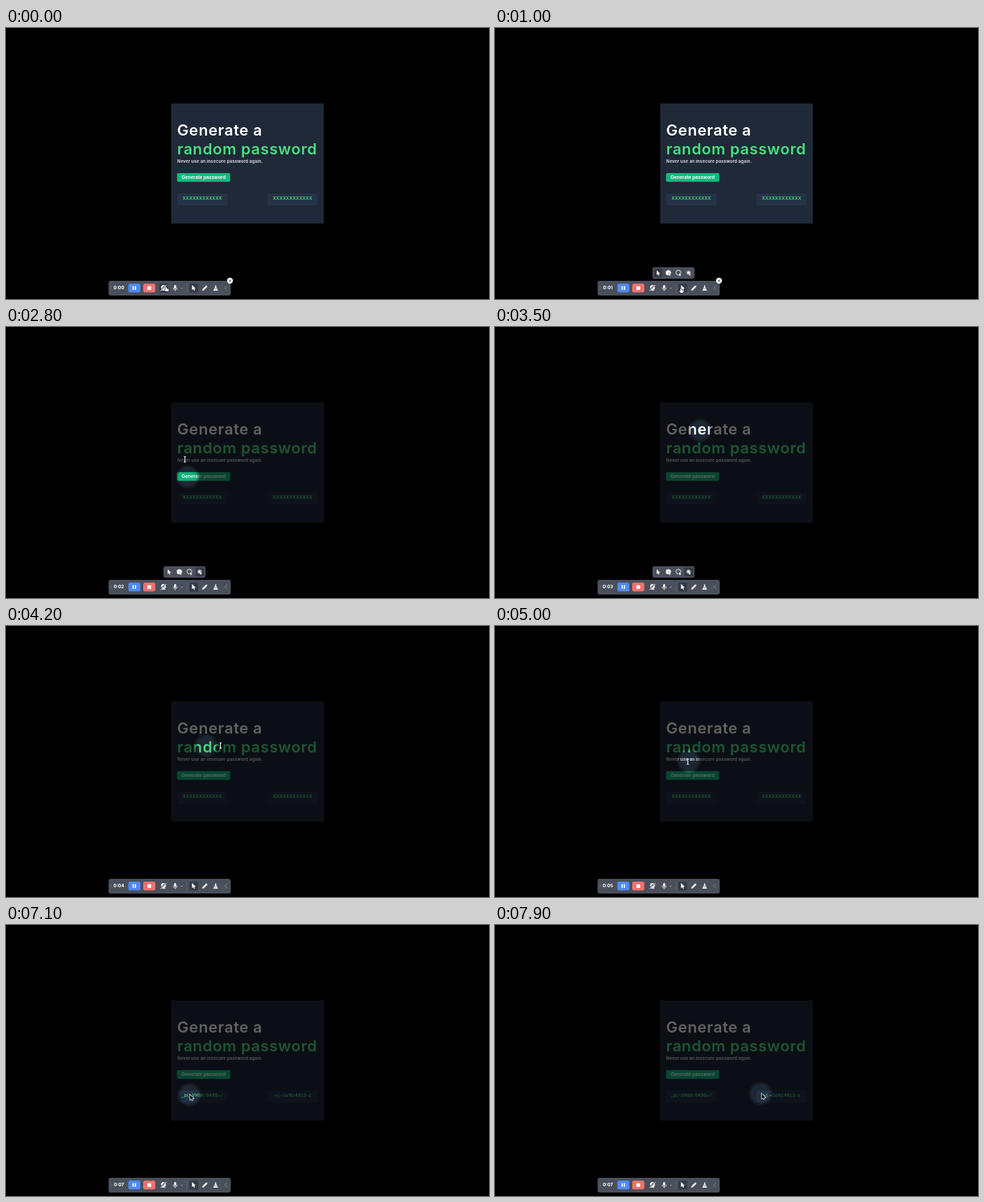
Animation of 690 by 388 pixels, one loop 8 s. Source, as an HTML page with a canvas:

```html
<!DOCTYPE html>
<html lang="en">
<head>
<meta charset="utf-8">
<title>Password generator with spotlight</title>
<style>
  html, body { margin: 0; width: 100%; height: 100%; overflow: hidden; background: #000; }
  canvas { display: block; }
</style>
</head>
<body>
<canvas id="stage" width="690" height="388"></canvas>
<script>
const LOOP = 8000, SPOT_R = 18, SPOT_LAG = 60;
const ctx = document.getElementById('stage').getContext('2d');
const shade = new OffscreenCanvas(218, 172);
const shadeCtx = shade.getContext('2d');
const CARD = { x: 236, y: 108, w: 218, h: 172 };
const SANS = 'Inter, "Open Sans", sans-serif';

// Pointer stops: time, x, y
const PATH = [
  [0, 229, 372], [300, 229, 372], [700, 266, 374], [1100, 266, 374],
  [1700, 278.5, 350], [2350, 278.5, 350], [2980, 250, 150], [3400, 293, 148],
  [3520, 293, 148], [3650, 345, 148], [4000, 262, 171], [4600, 432, 171],
  [4930, 277, 193], [5000, 275.5, 194], [5300, 268, 190], [5700, 268, 190],
  [6050, 290, 214], [6300, 304, 211], [6500, 298, 234], [6850, 262, 243],
  [7060, 262, 243], [7900, 381, 241.5]
];

const ARROW = new Path2D('M0 0V8.2L2 6.4L3.3 9.2L4.6 8.6L3.4 5.9H6Z');
const HAND = new Path2D('M-.9 .2Q0 -.9 .9 .2V2.6L4 3.3Q5 3.6 4.7 5L4 7.6H-.6L-3 4.6Q-2.6 3.5 -.9 4.5Z');
const PENCIL = new Path2D('M-3.8 3.8L-3.2 1.4L1.6 -3.4Q2.4 -4 3.2 -3.2Q4 -2.4 3.4 -1.6L-1.4 3.2Z');
const BROOM = new Path2D('M-.8 -4H.8V-.4H2.4V1H-2.4V-.4H-.8ZM-2.6 1.6H2.6L3.6 3.8H-3.6Z');

const within = (t, a, b) => t >= a && t < b;

function pointerAt(t) {
  let i = 1;
  while (i < PATH.length - 1 && PATH[i][0] < t) i++;
  const [t0, x0, y0] = PATH[i - 1], [t1, x1, y1] = PATH[i];
  const u = Math.min(1, Math.max(0, (t - t0) / (t1 - t0)));
  const e = u * u * (3 - 2 * u);
  return { x: x0 + (x1 - x0) * e, y: y0 + (y1 - y0) * e };
}

function box(x, y, w, h, r, fill) {
  ctx.fillStyle = fill;
  ctx.beginPath();
  ctx.roundRect(x, y, w, h, r);
  ctx.fill();
}

function disc(x, y, r, fill) {
  ctx.fillStyle = fill;
  ctx.beginPath();
  ctx.arc(x, y, r, 0, 7);
  ctx.fill();
}

function ring(x, y, r, color, width) {
  ctx.strokeStyle = color;
  ctx.lineWidth = width;
  ctx.beginPath();
  ctx.arc(x, y, r, 0, 7);
  ctx.stroke();
}

function line(color, width, ...pts) {
  ctx.strokeStyle = color;
  ctx.lineWidth = width;
  ctx.beginPath();
  for (let i = 0; i < pts.length; i += 2) ctx.lineTo(pts[i], pts[i + 1]);
  ctx.stroke();
}

function text(str, x, y, font, fill, align = 'left', spacing = 0) {
  ctx.font = font;
  ctx.letterSpacing = spacing + 'px';
  ctx.fillStyle = fill;
  ctx.textAlign = align;
  ctx.fillText(str, x, y);
}

function shape(path, x, y, scale, fill, outline) {
  ctx.save();
  ctx.translate(x, y);
  ctx.scale(scale, scale);
  if (outline) {
    ctx.strokeStyle = outline;
    ctx.lineWidth = 1.4;
    ctx.stroke(path);
  }
  ctx.fillStyle = fill;
  ctx.fill(path);
  ctx.restore();
}

function drawCard(t) {
  box(CARD.x, CARD.y, CARD.w, CARD.h, 0, '#1f2937');
  const title = `600 21.9px ${SANS}`;
  text('Generate a', 244.5, 153.8, title, '#fff', 'left', .65);
  text('random password', 244.5, 181, title, '#4ade80', 'left', .65);
  text('Never use an insecure password again.', 244.6, 192.8, `700 6.2px ${SANS}`, '#d1d5db', 'left', .1);

  box(244.3, 207.7, 76, 12.5, 2, within(t, 5950, 6600) ? '#06c748' : '#10b981');
  text('Generate password', 282.3, 216.2, 'bold 6.8px "Liberation Sans", Arial, sans-serif', '#fff', 'center');

  const done = t >= 6100;
  const words = done ? ['_p(~VHbh:0498+/', '+l;~!u/Kc48c3-z'] : ['XXXXXXXXXXXX', 'XXXXXXXXXXXX'];
  [280.5, 409.5].forEach((x, i) => {
    box(x - 36, 237, 72, 17, 2, '#253247');
    text(words[i], x, 246, `600 6.2px ${SANS}`, '#4ade80', 'center', .25);
  });
}

function drawShade(t) {
  const p = pointerAt(t - SPOT_LAG);
  const x = p.x - CARD.x, y = p.y - CARD.y;
  const c = shadeCtx;
  c.globalCompositeOperation = 'source-over';
  c.clearRect(0, 0, CARD.w, CARD.h);
  c.fillStyle = 'rgba(0,0,0,.62)';
  c.fillRect(0, 0, CARD.w, CARD.h);
  const hole = c.createRadialGradient(x, y, 0, x, y, SPOT_R);
  hole.addColorStop(0, '#000');
  hole.addColorStop(.7, 'rgba(0,0,0,.9)');
  hole.addColorStop(1, 'transparent');
  c.globalCompositeOperation = 'destination-out';
  c.fillStyle = hole;
  c.fillRect(x - SPOT_R, y - SPOT_R, SPOT_R * 2, SPOT_R * 2);
  ctx.drawImage(shade, CARD.x, CARD.y);
}

function drawToolbar(t) {
  const dark = '#343a45';
  box(146.5, 362, 174.5, 21, 3, '#4a505b');
  for (let i = 0; i < 6; i++) disc(149 + i % 2 * 1.6, 370.3 + (i >> 1) * 1.9, .45, '#858b95');
  text('0:0' + Math.floor(t / 1000), 161.2, 374.4, `700 6.5px ${SANS}`, '#fff', 'center');

  box(174.8, 366, 17.2, 12.6, 2.5, '#4f8af8');
  box(180.8, 369.6, 1.7, 5.4, .4, '#fff');
  box(184, 369.6, 1.7, 5.4, .4, '#fff');
  box(196, 366, 17.3, 12.6, 2.5, '#f2706e');
  box(202, 369.7, 5.3, 5.3, .6, '#fff');

  // Camera off
  if (t < 450) box(219, 366, 12.5, 12.8, 2, dark);
  disc(225, 371.5, 3.4, '#fff');
  disc(225, 371.5, 1.3, '#4a505b');
  box(222.3, 375, 5.4, 1.1, .5, '#fff');
  line('#4a505b', 2, 220.8, 376, 229, 367.6);
  line('#fff', 1, 220.8, 376.4, 229.2, 368);

  // Microphone
  box(240.2, 368, 3, 5.2, 1.5, '#fff');
  ctx.strokeStyle = '#fff';
  ctx.lineWidth = .8;
  ctx.beginPath();
  ctx.arc(241.7, 371.8, 2.9, 0, Math.PI);
  ctx.stroke();
  line('#fff', .9, 241.7, 374.6, 241.7, 376.5);
  box(250.2, 372, 2, .9, .3, '#bfc3c9');
  box(258, 366.5, .7, 12, 0, '#666c76');

  box(261.8, 366, 12.8, 12.8, 2, dark);
  shape(ARROW, 265.7, 367.8, .92, '#fff');
  shape(PENCIL, 284, 372.3, 1, '#fff');
  shape(BROOM, 299.5, 372.4, .95, '#fff');
  line('#8b9099', .9, 315.5, 369.2, 312.7, 372.3, 315.5, 375.4);

  if (t < 1400) {
    disc(320, 361.7, 4.2, '#fff');
    line('#222', .8, 318.5, 360.2, 321.5, 363.2);
    line('#222', .8, 321.5, 360.2, 318.5, 363.2);
  }
}

function drawMenu(t) {
  box(225, 342.5, 60, 16.5, 3, '#4a505b');
  box(t < 1900 ? 226.8 : 270.6, 344.6, 12.8, 12.4, 2, '#343a45');
  shape(ARROW, 231, 347, .82, '#fff');
  disc(247.7, 350.4, 3.7, '#fff');
  shape(ARROW, 248, 350.2, .55, '#fff', '#4a505b');
  ring(262, 350.2, 3.4, '#fff', .9);
  shape(ARROW, 263, 350.8, .5, '#fff', '#4a505b');
  ring(276.6, 350.3, 3, '#8f959e', 1);
  disc(276.6, 350.3, 2.1, '#fff');
  shape(ARROW, 277.2, 350.6, .45, '#fff', '#4a505b');
  if (within(t, 1700, 2500)) text('Spotlight', 276.7, 338, `400 5px ${SANS}`, '#e5e5e5', 'center');
}

function drawPointer(t) {
  const { x, y } = pointerAt(t);
  const onButton = x > 244 && x < 320 && y > 207 && y < 220.5;
  const onText = x > 244 && x < 446 && y > 133 && y < 197;
  if (y > 340 || onButton) {
    shape(HAND, x - .4, y - 1, .8, '#fff', '#333');
  } else if (onText) {
    line('#fff', 1, x, y - 3.5, x, y + 4);
    line('#fff', .9, x - 1.7, y - 3.6, x + 1.7, y - 3.6);
    line('#fff', .9, x - 1.7, y + 4, x + 1.7, y + 4);
  } else {
    shape(ARROW, x, y, .88, '#111', '#fff');
  }
}

function render() {
  const t = performance.now() % LOOP;
  ctx.fillStyle = '#000';
  ctx.fillRect(0, 0, 690, 388);
  drawCard(t);
  if (t >= 1950) drawShade(t);
  drawToolbar(t);
  if (within(t, 700, 3900)) drawMenu(t);
  drawPointer(t);
  requestAnimationFrame(render);
}
render();
</script>
</body>
</html>
```
